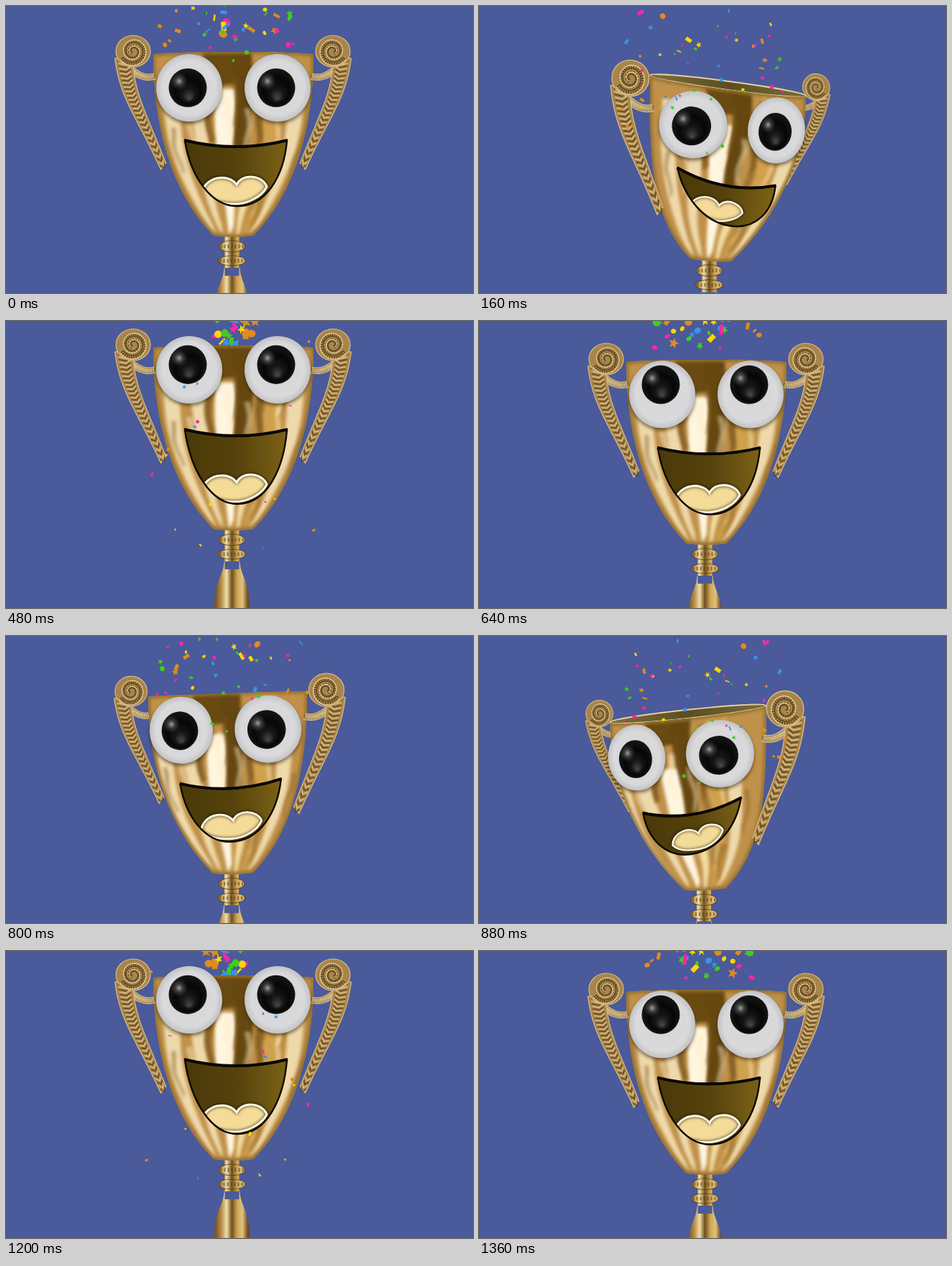
Animation, 650 px wide and 400 px high, one loop 1.44 s. Source, as an HTML page with a canvas:

```html
<!DOCTYPE html>
<html lang="en">
<head>
<meta charset="utf-8">
<title>Happy trophy</title>
<style>
html, body { margin: 0; width: 100%; height: 100%; overflow: hidden; background: #4a5a9a; }
canvas { display: block; width: 650px; height: 400px; }
</style>
</head>
<body>
<canvas id="stage" width="650" height="400"></canvas>
<script>
const ctx = document.getElementById('stage').getContext('2d');
const STEP = 80, STEPS = 18, HALF = 9, TAU = Math.PI * 2;

// Mirrors points across x = axis / 2; lean drops the far right end
const flip = (pts, axis, lean = 0) => pts.map(([x, y, ...rest]) =>
  [axis - x, y + lean * (axis - x - 290), ...rest]);

// cup: rim end, foot; eye: x, y, rx, ry; handle: scroll top, outer edge, tail
const half = {
  cup: [[205, 68], [289, 320]],
  eye: [255, 114, 46, 47],
  corner: [249, 188],
  handle: [[178, 41], [151, 75], [222, 228]]
};
const front = {
  turn: 0, rim: -4, shift: 0,
  cupL: half.cup, cupR: flip(half.cup, 633),
  eyes: [half.eye, ...flip([half.eye], 633)],
  mouth: [half.corner, [391, 188], [320, 205], [322, 279]],
  handleL: half.handle, handleR: flip(half.handle, 632)
};
// mouth: left corner, right corner, lip control, lowest point
const left = {
  turn: -1, rim: 16, shift: -.2,
  cupL: [[160, 173], [284, 388]], cupR: [[371, 126], [343, 383]],
  eyes: [[184, 225, 34, 45], [293, 214, 49, 47]],
  mouth: [[208, 307], [338, 264], [277, 318], [270, 329]],
  handleL: [[156, 138], [145, 165], [205, 262]],
  handleR: [[395, 112], [428, 155], [354, 354]]
};
const across = pts => flip(pts, 642, .05);
const [mouthR, mouthL, lipCtrl, lowest] = across(left.mouth);
const right = {
  turn: 1, rim: 16, shift: .06,
  cupL: across(left.cupR), cupR: across(left.cupL),
  eyes: flip(left.eyes, 634, .05).reverse(),
  mouth: [mouthL, mouthR, lipCtrl, lowest],
  handleL: across(left.handleR), handleR: across(left.handleL)
};

function mix(a, b, t) {
  if (typeof a === 'number') return a + (b - a) * t;
  if (Array.isArray(a)) return a.map((v, i) => mix(v, b[i], t));
  return Object.fromEntries(Object.keys(a).map(k => [k, mix(a[k], b[k], t)]));
}
const smooth = t => t * t * (3 - 2 * t);
const rand = n => { const s = Math.sin(n * 127.1 + 11.7) * 43758.5453; return s - Math.floor(s); };

function cubic(p, t) {
  const s = 1 - t, w = [s * s * s, 3 * s * s * t, 3 * s * t * t, t * t * t];
  return [0, 1].map(k => p.reduce((sum, q, i) => sum + q[k] * w[i], 0));
}
function sideCurve([top, foot], dir) {
  const h = foot[1] - top[1];
  return [top, [top[0], top[1] + h * .4], [foot[0] + dir * 58, foot[1] - h * .23], foot];
}

function gradient(a, b, ...colors) {
  const g = ctx.createLinearGradient(...a, ...b);
  colors.forEach((c, i) => g.addColorStop(i / (colors.length - 1), c));
  return g;
}
function draw(fill, stroke, width, path) {
  if (fill) { ctx.fillStyle = fill; path ? ctx.fill(path) : ctx.fill(); }
  if (stroke) {
    ctx.strokeStyle = stroke;
    ctx.lineWidth = width;
    path ? ctx.stroke(path) : ctx.stroke();
  }
}

// A vertical reflection that follows the taper of the cup
function streak(sides, u, w, v0, v1, color) {
  ctx.beginPath();
  for (let i = 0; i <= 24; i++) {
    const q = (i <= 12 ? i : 24 - i) / 12, v = v0 + (v1 - v0) * q;
    const at = u + (i <= 12 ? -w : w) * (1 - q * .3) + .012 * Math.sin(q * 7 + u * 20);
    ctx.lineTo(...mix(cubic(sides[0], v), cubic(sides[1], v), at));
  }
  draw(color);
}

function reflections(sides, shift) {
  const add = (u, w, v0, v1, color) => streak(sides, u + shift, w, v0, v1, color);
  [.1, .27, .9].forEach(u => add(u, .055, .1, 1, '#eed9ab'));
  add(.77, .07, -.05, 1, '#d0a14c');
  add(.61, .05, .6, 1.02, '#f3dc9f');
  add(.45, .07, .16 + Math.abs(shift), 1, '#fff6e0');
  add(.45, .14, -.05, .15, '#694a11');
  add(.56, .065, -.05, .58, '#65470f');
  [.34, .68].forEach(u => add(u, .028, .12, .44, '#8a6224'));
  for (let i = 0; i < 16; i++) {
    const v = rand(i + 40) * .7;
    add(rand(i + 80), .01 + .02 * rand(i + 120), v, v + .25, i % 2 ? 'rgba(120,82,28,.45)' : 'rgba(255,240,205,.45)');
  }
}

function cup(p) {
  const sides = [sideCurve(p.cupL, -1), sideCurve(p.cupR, 1)];
  const [L, l1, l2, A] = sides[0], [R, r1, r2, B] = sides[1];
  const nx = (L[1] - R[1]) / Math.hypot(R[0] - L[0], R[1] - L[1]) * 4 / 3;
  const edge = ([x, y], k) => [x + nx * k, y + k * 4 / 3];
  const body = new Path2D();
  body.moveTo(...L);
  body.bezierCurveTo(...l1, ...l2, ...A);
  body.quadraticCurveTo((A[0] + B[0]) / 2, (A[1] + B[1]) / 2 + 4, ...B);
  body.bezierCurveTo(...r2, ...r1, ...R);
  body.bezierCurveTo(...edge(R, p.rim), ...edge(L, p.rim), ...L);

  if (p.rim > 0) {
    ctx.beginPath();
    ctx.moveTo(...L);
    ctx.bezierCurveTo(...edge(L, -p.rim), ...edge(R, -p.rim), ...R);
    ctx.bezierCurveTo(...edge(R, p.rim), ...edge(L, p.rim), ...L);
    draw(gradient(L, R, '#7d6f3c', '#5a4d22', '#7a6d3a'), '#e4cf9c', 2);
  }
  draw('#c0914a', null, 0, body);
  ctx.save();
  ctx.clip(body);
  ctx.filter = 'blur(2px)';
  reflections(sides, p.shift);
  draw(null, '#94702f', 6, body);
  ctx.restore();
}

// Handle parts share one upright space that each pose maps by three points
const spine = [[164, 72], [168, 125], [188, 150], [220, 226]];
const branch = [[176, 90], [184, 96], [194, 102], [207, 98]];
const [O, X, Y] = half.handle;

function carved(curve, w0, w1) {
  const n = 44, shape = new Path2D(), dark = new Path2D(), lit = new Path2D();
  const at = (t, side) => {
    const [x, y] = cubic(curve, t), [x2, y2] = cubic(curve, t + .01);
    const k = (w0 + (w1 - w0) * t) / 2 * side / Math.hypot(x2 - x, y2 - y);
    return [x + (y - y2) * k, y + (x2 - x) * k];
  };
  for (let i = 0; i <= 2 * n; i++) shape.lineTo(...(i <= n ? at(i / n, 1) : at(2 - i / n, -1)));
  shape.closePath();
  for (let i = 1; i < n; i++) {
    const rib = i % 2 ? dark : lit;
    rib.moveTo(...at(i / n, .7));
    rib.lineTo(...at((i + 1) / n, -.1));
    rib.lineTo(...at(i / n, -.65));
  }
  draw('#a9854b', '#d9bd84', 1.2, shape);
  draw(null, '#5f4720', 1.5, dark);
  draw(null, '#e6d09b', 1.1, lit);
}

function spiral(r0, color, width) {
  ctx.beginPath();
  for (let i = 0; i <= 50; i++) {
    const a = 2.6 - i * .27, r = r0 * (1 - i / 58);
    ctx.lineTo(177 + r * Math.cos(a), 63 + r * Math.sin(a));
  }
  draw(null, color, width);
}

function handle([o, x, y]) {
  const det = (X[0] - O[0]) * (Y[1] - O[1]) - (X[1] - O[1]) * (Y[0] - O[0]);
  const row = k => {
    const U = x[k] - o[k], V = y[k] - o[k];
    const a = (U * (Y[1] - O[1]) - V * (X[1] - O[1])) / det;
    const c = (V * (X[0] - O[0]) - U * (Y[0] - O[0])) / det;
    return [a, c, o[k] - a * O[0] - c * O[1]];
  };
  const [a, c, e] = row(0), [b, d, f] = row(1);
  ctx.save();
  ctx.transform(a, b, c, d, e, f);
  carved(branch, 9, 8);
  carved(spine, 25, 10);
  ctx.beginPath();
  ctx.ellipse(177, 63, 24, 22, 0, 0, TAU);
  draw('#a9854b', '#d9bd84', 1.2);
  ctx.setLineDash([1.6, 1.6]);
  spiral(19, '#5f4720', 5);
  ctx.setLineDash([]);
  spiral(21.5, '#e6d09b', 1.3);
  spiral(16, '#5f4720', 1.3);
  ctx.restore();
}

function stem(p) {
  const A = p.cupL[1], B = p.cupR[1];
  ctx.save();
  ctx.translate((A[0] + B[0]) / 2 - 2, (A[1] + B[1]) / 2);
  const metal = gradient([-22, 0], [22, 0], '#7c5b27', '#b88f49', '#f2dda7', '#70501b', '#cda558', '#dfc17d', '#6d4d1d');
  ctx.beginPath();
  ctx.rect(-10, -4, 20, 60);
  ctx.moveTo(-11, 45);
  ctx.bezierCurveTo(-12, 66, -24, 70, -25, 112);
  ctx.lineTo(25, 112);
  ctx.bezierCurveTo(24, 70, 12, 66, 11, 45);
  draw(metal);
  [[15, 18, 8], [35, 19, 7]].forEach(([y, rx, ry]) => {
    ctx.beginPath();
    ctx.ellipse(0, y, rx, ry, 0, 0, TAU);
    draw(metal, 'rgba(70,48,14,.6)', 1.2);
    ctx.beginPath();
    ctx.moveTo(-rx + 2, y);
    ctx.lineTo(rx - 2, y);
    ctx.setLineDash([2, 3]);
    draw(null, 'rgba(85,60,22,.6)', 5);
    ctx.setLineDash([]);
  });
  ctx.restore();
}

function disc(x, y, r, fx, fy, ...colors) {
  const g = ctx.createRadialGradient(fx, fy, 0, x, y, r);
  colors.forEach((c, i) => g.addColorStop(i / (colors.length - 1), c));
  ctx.beginPath();
  ctx.arc(x, y, r, 0, TAU);
  draw(g);
}

function eye([x, y, rx, ry], turn, look) {
  ctx.save();
  ctx.translate(x, y);
  ctx.rotate(turn * .15);
  ctx.scale(rx / 46, ry / 46);
  ctx.shadowColor = 'rgba(50,32,5,.6)';
  ctx.shadowBlur = 5;
  ctx.shadowOffsetY = 3;
  disc(0, 0, 46, 0, 0, '#d5d5d7', '#d6d6d8', '#d7d7d9', '#d8d8da', '#dadadc', '#c2c2c4');
  ctx.shadowColor = 'transparent';
  const py = look + Math.abs(turn) * 4;
  disc(-2, py, 26.5, 0, py + 15, '#4b4b4b', '#161616', '#060606', '#161616');
  disc(-14, py - 9, 12, -14, py - 9, 'rgba(230,230,230,.7)', 'rgba(150,150,150,.3)', 'rgba(120,120,120,0)');
  ctx.restore();
}

const tongueShape = new Path2D('M-45 4C-41-18-9-24 3-7C11-24 40-20 45-4C38 10 18 20 0 20C-22 20-38 14-45 4Z');

function mouth([L, R, lip, low], turn) {
  const ex = R[0] - L[0], ey = R[1] - L[1];
  const dx = low[0] - (L[0] + R[0]) / 2, dy = low[1] - (L[1] + R[1]) / 2;
  const side = (q, s) => [q[0] + dx * .55 + ex * s, q[1] + dy * .55 + ey * s];
  const base = s => [low[0] + ex * s, low[1] + ey * s];
  const shape = new Path2D();
  shape.moveTo(...L);
  shape.quadraticCurveTo(...lip, ...R);
  shape.bezierCurveTo(...side(R, -.04), ...base(.28), ...low);
  shape.bezierCurveTo(...base(-.26), ...side(L, .05), ...L);
  draw(gradient(L, R, '#4a3909', '#55420c', '#7c6216'), null, 0, shape);
  ctx.save();
  ctx.clip(shape);
  ctx.translate(low[0] - 4 - turn * 25, low[1] - 23);
  ctx.rotate(Math.atan2(ey, ex) * 1.35);
  ctx.scale(1 - Math.abs(turn) * .38, 1 - Math.abs(turn) * .4);
  ctx.shadowColor = '#201703';
  ctx.shadowBlur = 4;
  draw('#f4db98', '#fff9e6', 3, tongueShape);
  ctx.restore();
  draw(null, '#0d0a02', 2.4, shape);
  ctx.beginPath();
  ctx.moveTo(L[0] - 1, L[1] - 1);
  ctx.quadraticCurveTo(...lip, R[0] + 1, R[1] - 1);
  draw(null, '#080602', 4);
}

const colors = ['#40cc1f', '#ff25a8', '#ffd500', '#3c91ea', '#e08b1e'];

function piece(kind, r, squash) {
  ctx.beginPath();
  if (kind === 0) {
    for (let i = 0; i < 10; i++) {
      const d = i % 2 ? r * .42 : r, a = i * TAU / 10;
      ctx.lineTo(d * Math.sin(a), -d * Math.cos(a) * (.5 + squash / 2));
    }
  } else if (kind === 1) {
    ctx.ellipse(0, 0, r * .7, r * .7 * squash, 0, 0, TAU);
  } else {
    ctx.rect(-r * .8, -r * .5 * squash, r * 1.6, r * squash);
  }
}

// Each piece bursts from the cup once per half loop, then falls and shrinks
function confetti(step, fresh) {
  for (let i = 0; i < 62; i++) {
    const [a, b, c, d, e] = [1, 2, 3, 4, 5].map(k => rand(i * 7 + k));
    const t = step - 5.2 - a * a * 3.6;
    const age = ((t % HALF) + HALF) % HALF;
    if (age < 2.4 !== fresh || age > 7.9) continue;
    const way = Math.floor(t / HALF) % 2 ? 1 : -1;
    const x = 312 + way * (b * 2 - 1) * 130 * (1 - Math.exp(-age * .4));
    const y = 55 - (40 + c * 130) * (1 - Math.exp(-age * .8)) + (2.4 + d * 5) * age * age;
    ctx.save();
    ctx.translate(x, y);
    ctx.rotate(e * TAU + age * (b - .5) * 4);
    piece(i % 3, (6 + e * 5) * (.28 + .72 * Math.exp(-age / 3)), .35 + .65 * Math.abs(Math.cos(age * 1.7 + c * 6)));
    draw(colors[i % 5]);
    ctx.restore();
  }
}

function render(step) {
  const beat = step % HALF;
  const turned = smooth(beat < 4 ? beat / 4 : Math.max(0, (6 - beat) / 2));
  const p = mix(front, step < HALF ? right : left, turned);
  const hop = Math.max(0, (HALF - beat) / 3);
  const up = beat < 6 ? 0 : hop * hop;
  const look = beat < 6 ? 0 : 7 * up - 14;

  ctx.fillStyle = '#4a5a9a';
  ctx.fillRect(0, 0, 650, 400);
  confetti(step, true);
  ctx.save();
  if (beat >= 6) ctx.translate(0, -30 * hop);
  stem(p);
  if (p.turn < 0) handle(p.handleL);
  if (p.turn > 0) handle(p.handleR);
  cup(p);
  if (p.turn >= 0) handle(p.handleL);
  if (p.turn <= 0) handle(p.handleR);
  p.eyes.forEach(([x, y, rx, ry]) => eye([x, y - 16 * up, rx, ry], p.turn, look));
  mouth(p.mouth.map(([x, y], i) => [x, y + (i < 3 ? -6 : 6) * up]), p.turn);
  ctx.restore();
  confetti(step, false);
}

let shown = -1;
function tick() {
  const step = Math.floor(performance.now() / STEP) % STEPS;
  if (step !== shown) render(shown = step);
  requestAnimationFrame(tick);
}
tick();
</script>
</body>
</html>
```
